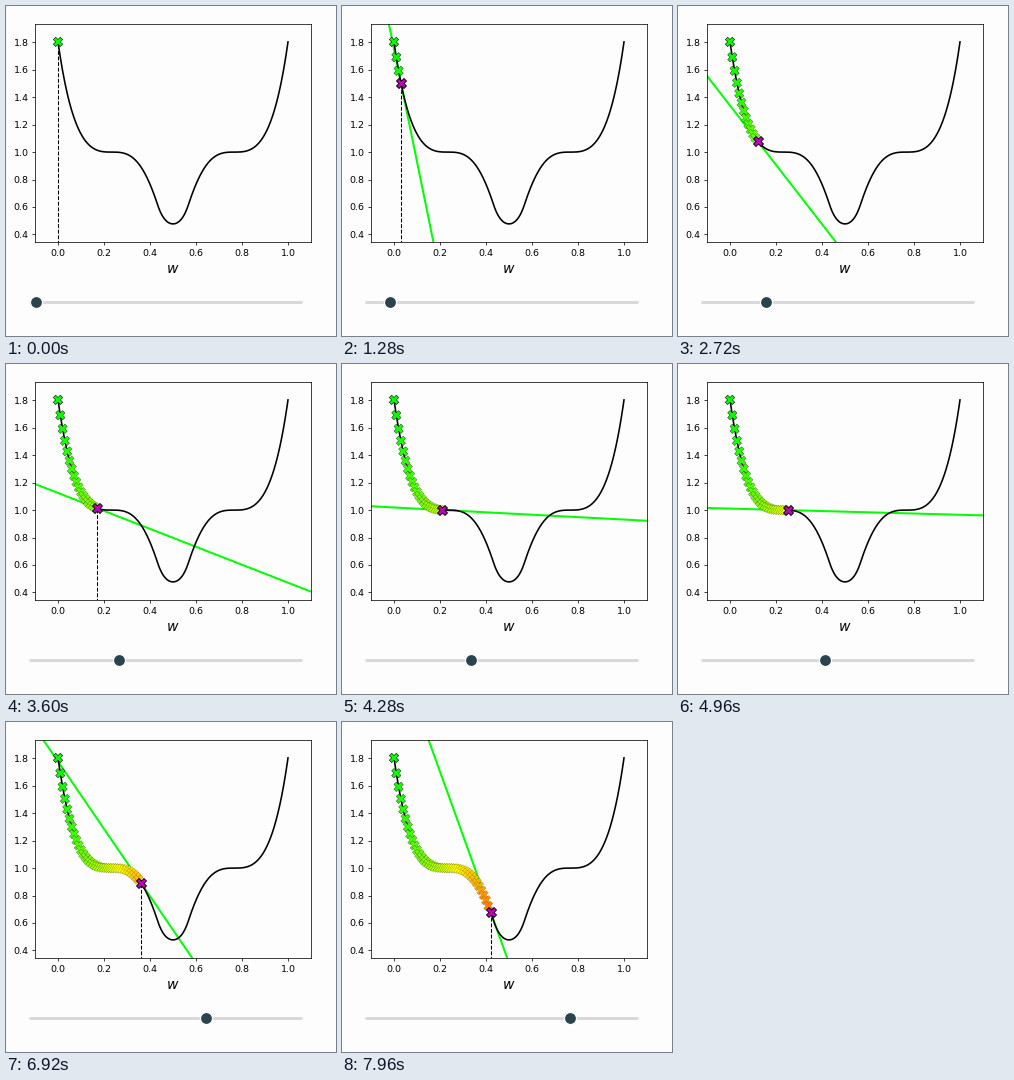
Animation of 330x330 px, one loop 8 s. Source, as a matplotlib script:

```python
import math

import numpy as np
import matplotlib.pyplot as plt
from matplotlib.animation import FuncAnimation

SIZE, DPI = 330, 66
FRAMES, INTERVAL = 200, 40
STEP, HALF, COUNT = 0.01, 28, 56
PAPER = "#fefdfe"


def cost(w):
    left = np.maximum(0, (0.7 - 3 * w) ** 3 + 1)
    right = np.maximum(0, (3 * w - 2.3) ** 3 + 1)
    return left ** 2 + right ** 2


def slope(w, h=1e-5):
    return (cost(w + h) - cost(w - h)) / (2 * h)


def trail_color(k):
    """Green to yellow over the first half, yellow to red over the second."""
    if k < HALF:
        return (k / (HALF - 1), 1, 0)
    return (1, max(0, 1 - (k - HALF) / (HALF - 1)), 0)


def stage_of(frame):
    """Two stages per descent step, after a short hold at the start."""
    return max(0, math.floor(0.466 * frame - 5.925))


fig = plt.figure(figsize=(SIZE / DPI, SIZE / DPI), dpi=DPI, facecolor=PAPER)

# Cost plot
left, right, top, bottom = 29.0, 305.0, 17.7, 236.1
ax = fig.add_axes([left / SIZE, 1 - bottom / SIZE,
                   (right - left) / SIZE, (bottom - top) / SIZE],
                  facecolor=PAPER)
w = np.linspace(0, 1, 500)
g = cost(w)
gap = 0.1 * (g.max() - g.min())
ax.set_xlim(-0.1, 1.1)
ax.set_ylim(g.min() - gap, g.max() + gap)
ax.set_xticks(np.arange(0, 1.1, 0.2))
ax.set_yticks(np.arange(0.4, 1.9, 0.2))
ax.tick_params(labelsize=10.3)
ax.plot(w, g, color="k", lw=1.75, zorder=2)
fig.text(166.5 / SIZE, 1 - 262.7 / SIZE, "$w$", fontsize=15.3,
         ha="center", va="center")

w_path = STEP * np.arange(COUNT)
path = np.column_stack([w_path, cost(w_path)])
trail = ax.scatter(path[:, 0], path[:, 1], s=104, marker="X", edgecolors="k",
                   c=[trail_color(k) for k in range(COUNT)],
                   linewidths=0.6 * (np.arange(COUNT) + 1.0) ** -0.4,
                   zorder=3)
current = ax.scatter([0], [0], s=118, marker="X", c="m", edgecolors="k",
                     linewidths=1, zorder=4)
tangent, = ax.plot([], [], color="lime", lw=2.2, zorder=1)
drop, = ax.plot([], [], "k--", lw=1.15, zorder=0)

# Slider, in pixel coordinates; the knob has a paper-coloured rim
bar = fig.add_axes([0, 0, 1, 1], facecolor="none")
bar.set_xlim(0, SIZE)
bar.set_ylim(SIZE, 0)
bar.axis("off")
BAR_Y = 296.2
bar.plot([23, 296], [BAR_Y, BAR_Y], color="#d8d8da", lw=3.2,
         solid_capstyle="butt")
knob, = bar.plot([], [], "o", ms=13.2, mfc="#29434f", mec=PAPER, mew=1.4)


def draw(frame):
    stage = stage_of(frame)
    k = max(0, (stage - 1) // 2)
    w_k, g_k = path[k]
    started = stage > 0

    trail.set_offsets(path[:k if started else 1])
    current.set_offsets([path[k]])
    current.set_visible(started)
    ends = np.array([-0.3, 1.3])
    tangent.set_data(ends, g_k + slope(w_k) * (ends - w_k))
    tangent.set_visible(started)
    drop.set_data([w_k, w_k], [0, g_k])
    drop.set_visible(stage % 2 == 0)
    knob.set_data([30.1 + 2.297 * stage], [BAR_Y])
    return trail, current, tangent, drop, knob


anim = FuncAnimation(fig, draw, frames=FRAMES, interval=INTERVAL,
                     init_func=lambda: draw(0), repeat=True, repeat_delay=0,
                     blit=False)
plt.show()
```
